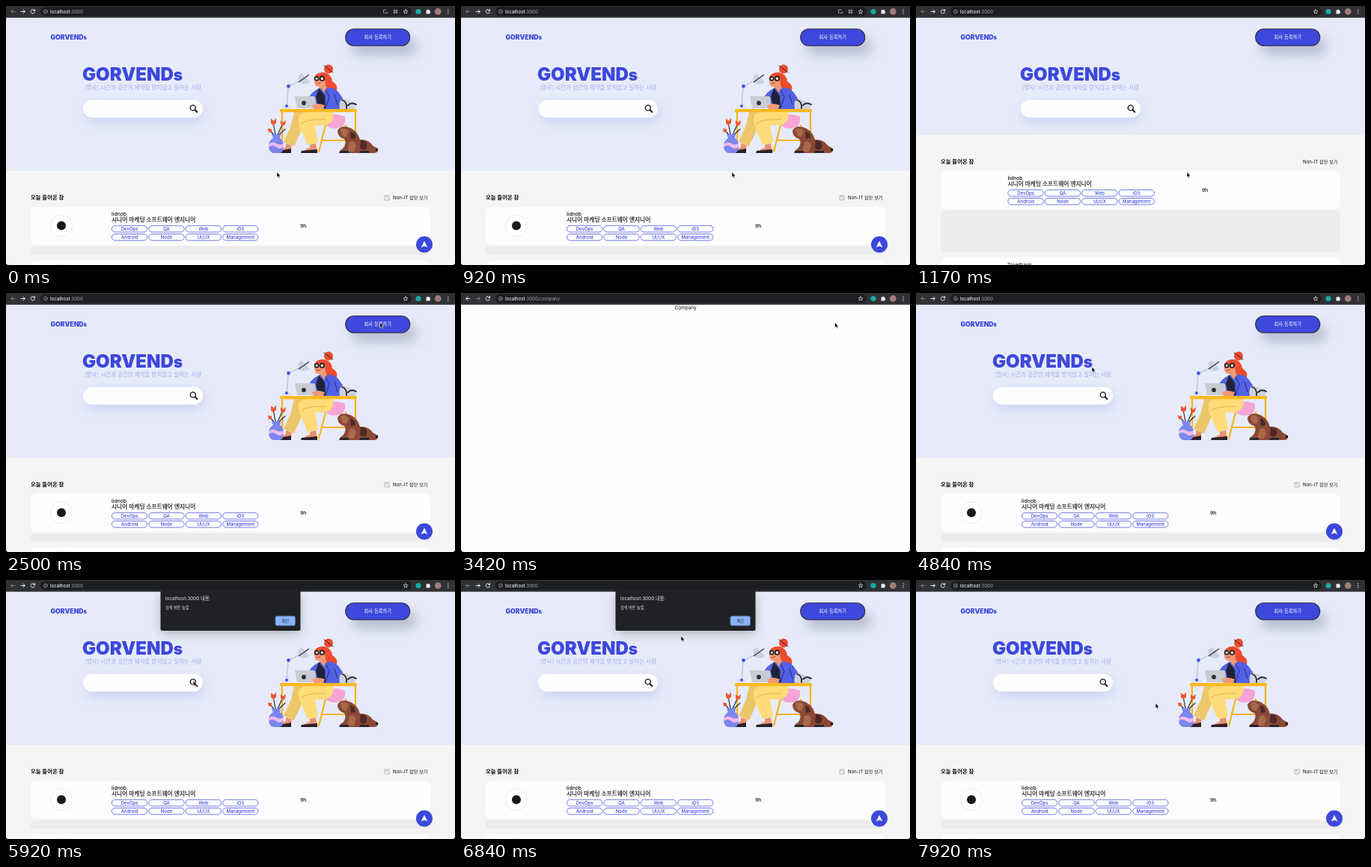
These frames come from a looping animation (600x347 px, 8000 ms). An HTML page:

```html
<!DOCTYPE html>
<html lang="ko">
<head>
<meta charset="utf-8">
<title>Remote job board</title>
<style>
html, body { margin: 0; width: 100%; height: 100%; overflow: hidden; background: #000; }
svg { display: block; }
text { font-family: Inter, "Noto Sans CJK KR", "Noto Sans CJK", sans-serif; font-size: 6.8px; fill: #111; }
.mid { text-anchor: middle; }
.logo { font-weight: 900; fill: #3d48dc; }
.line { fill: none; stroke-linecap: round; stroke-linejoin: round; }
.tag rect { fill: #fff; stroke: #4d57df; stroke-width: .8; }
.tag text { font-size: 6px; font-weight: 500; fill: #3d48dc; }
#job, #age { font-weight: 500; }
.loading .ready, .loading #fresh, .company #home, .home #company, .loading #company { display: none; }
.loading #intro { transform: translateX(37px); }
.loading #list { transform: translateY(-48px); }
.loading #job { transform: translateX(-18.5px); }
.loading #age { transform: translateX(-11px); }
#back, #forward { stroke: #e8eaed; }
.home #back, .loading #back, .company #forward { stroke: #7d7f83; }
</style>
</head>
<body>
<svg width="600" height="347" viewBox="0 0 600 347">
  <defs>
    <clipPath id="window"><path d="M0 0H600V343Q600 347 596 347H4Q0 347 0 343Z"/></clipPath>
    <filter id="soft" x="-40%" y="-150%" width="180%" height="400%"><feGaussianBlur stdDeviation="7.5"/></filter>
  </defs>
  <g clip-path="url(#window)">
    <rect width="600" height="347" fill="#fdfdfd"/>

    <g id="company"><text class="mid" x="300" y="21.8" style="font-size:6.4px">Company</text></g>

    <g id="home">
      <rect y="15" width="600" height="332" fill="#f5f5f5"/>
      <rect id="hero" y="15" width="600" height="206" fill="#e7ebf9"/>
      <text class="logo" x="59.5" y="45.2" style="font-size:8.7px">GORVEND<tspan font-size="7.6">s</tspan></text>
      <rect x="461" y="42" width="88" height="24" rx="12" fill="#737995" opacity=".4" filter="url(#soft)"/>
      <rect x="453.7" y="30.7" width="86" height="22.6" rx="11.3" fill="#3d48dc" stroke="#303038" stroke-width="1.1"/>
      <text class="mid" x="496.8" y="44.3" style="font-size:6.3px;fill:#fff">회사 등록하기</text>

      <g id="intro">
        <text class="logo" x="102" y="99.8" style="font-size:24px">GORVEND<tspan font-size="21">s</tspan></text>
        <text x="105" y="111.6" style="font-size:7.5px;font-weight:300;fill:#a3aaee">[명사] 시간과 공간의 제약을 받지않고 일하는 사람</text>
        <rect x="105" y="132" width="160" height="24" rx="12" fill="#98a4e5" opacity=".34" filter="url(#soft)"/>
        <rect x="103" y="126" width="160" height="23.5" rx="11.7" fill="#fdfdfd"/>
        <g class="line" stroke="#111"><circle cx="249.8" cy="136.4" r="3.5" stroke-width="1.4"/><path d="M252.7 139.4L255.3 142" stroke-width="2"/></g>
      </g>

      <g id="scene" class="ready">
        <!-- lamp -->
        <path d="M375 137L377 108L395 99" class="line" stroke="#c5cae0" stroke-width="1.8"/>
        <path d="M390 94L395 90L406 102Q397 108 392 102Z" fill="#cbd0e1"/>
        <path d="M391 102L405 92" stroke="#32323e" stroke-width="1.2"/>
        <circle cx="377.5" cy="107.5" r="2.4" fill="#4356e0"/>
        <path d="M368 138Q368 132 375 132Q382 132 382 138Z" fill="#dfe3f2"/>
        <circle cx="375" cy="134" r="2" fill="#4356e0"/>
        <!-- desk and stool legs -->
        <path d="M369 141V196M467 141V196M427 160L418 195M454 160L462 194M423 180H458" class="line" stroke="#f5b31e" stroke-width="2.2"/>
        <path d="M426 147Q440 143 453 148Q455 165 437 164Q424 163 426 147Z" fill="#f6a4d5"/>
        <!-- hair, head and jacket -->
        <circle cx="431" cy="84.5" r="6" fill="#ed4c2e"/>
        <path d="M425 80L437 89" class="line" stroke="#25222b" stroke-width="1"/>
        <path d="M412 96Q415 88 425 89Q435 91 436 101Q444 105 442 113Q438 119 430 116L424 103Z" fill="#ed4c2e"/>
        <path d="M412 95Q420 91 426 97L427 106L430 112L420 115L418 108Q412 109 412 100Z" fill="#f19a77"/>
        <path d="M412 95Q419 86 429 94L426 99L422 94Z" fill="#ed4c2e"/>
        <path d="M405 122Q411 111 424 109Q438 108 444 115L456 132L451 138H412L407 133Z" fill="#5262e5"/>
        <path d="M418 110L426 120L427 137H418L414 122Z" fill="#202337"/>
        <path d="M419 108L425 116L429 109Z" fill="#f19a77"/>
        <path d="M427 112L432 122L427 137M439 119L443 132" class="line" stroke="#222970" stroke-width="1"/>
        <g class="line" stroke="#17171d" stroke-width="1.6"><circle cx="415.2" cy="97.2" r="2.5" fill="#f7d5bd"/><circle cx="422.4" cy="97.2" r="2.8" fill="#f7d5bd"/></g>
        <path d="M415 103.5Q418 105 420 102.5" class="line" stroke="#c53831" stroke-width="1"/>
        <!-- trousers and shoes -->
        <path d="M385 142H405L395 166L385 188L371 182L381 160Z" fill="#ecc66a"/>
        <path d="M437 142Q440 158 424 160H413L417 183L403 186L392 160Q387 143 402 142Z" fill="#ffdc78"/>
        <path d="M394 158Q401 151 428 152" class="line" stroke="#dda639" stroke-width=".8"/>
        <path d="M374 184L382 187L380 196H368Q369 191 374 189ZM406 186L414 184L416 196H397Q400 191 406 190Z" fill="#e8916f"/>
        <path d="M366 194L381 191V197H365ZM395 194L416 192V197H394Z" fill="#2b2029"/>
        <!-- desktop -->
        <path d="M446 138Q444 125 451 124L468 131L466 138Z" fill="#cdd1dd"/>
        <path d="M449 126Q456 128 455 137M457 133Q462 128 468 132" class="line" stroke="#262932" stroke-width="1.8"/>
        <rect x="366" y="138" width="103" height="4.2" rx="1" fill="#f9b920"/>
        <path d="M386 121H411Q413 121 413.3 123L415 137H389Z" fill="#c9ccd3"/>
        <circle cx="398" cy="130" r="2.9" fill="#29303d"/>
        <path d="M409 133Q416 129 426 133L424 138H411Z" fill="#f19a77"/>
        <!-- flowers -->
        <path d="M361 177L357 156M361 177L370 157M360 175L353 167M363 174L373 165" class="line" stroke="#272e41" stroke-width="1.2"/>
        <path d="M354 151L358 154L361 150L361 157L357 160L354 157ZM367 153L370 156L374 153L373 159L369 161L367 158ZM350 164L355 165L355 169L351 169Z" fill="#ed5731"/>
        <path d="M355 172H367L366 177Q371 180 371 187Q371 196 366 197H357Q351 195 351 187Q351 181 357 177Z" fill="#7b86ee"/>
        <path d="M351 185Q356 181 361 184T371 184V189Q366 193 361 189T351 189Z" fill="#efb9ec"/>
        <!-- dog -->
        <path d="M443 167Q447 160 456 162Q469 165 473 179Q484 178 490 187L497 191Q498 197 491 197H447Q443 195 450 191Q456 184 452 178Q443 176 443 167Z" fill="#8a4935"/>
        <path d="M447 165Q454 162 458 168L455 175Q448 176 447 165ZM459 183Q465 178 468 187L465 195H456Z" fill="#a9694c"/>
        <path d="M474 180Q484 180 482 190Q478 195 473 190ZM460 168Q467 169 467 177L461 178Z" fill="#4d2928"/>
        <circle cx="495.5" cy="192.5" r="1.8" fill="#202026"/>
        <path d="M447 194H458V197H445ZM473 194H485V197H472Z" fill="#26262f"/>
      </g>

      <g id="list">
        <text x="33" y="259" style="font-size:7.4px;font-weight:700">오늘 들어온 잡</text>
        <g class="ready"><rect x="505.3" y="253" width="7.8" height="7.8" rx="1.3" fill="#cfcfcf"/><path d="M507 257L508.7 258.8L511.5 255" class="line" stroke="#fff" stroke-width="1.1"/></g>
        <text x="517" y="258.5" style="font-size:6.15px">Non-IT 잡만 보기</text>
        <rect x="33" y="269" width="534" height="50.5" rx="8" fill="#fdfdfd"/>
        <g class="ready"><circle cx="74" cy="294.3" r="14.5" fill="#fff" stroke="#e6e6e6" stroke-width=".8"/><circle cx="74" cy="294.3" r="6" fill="#181a1f"/></g>
        <g id="job">
          <text x="141" y="281.4">lidnob</text>
          <text x="141" y="289.4" stroke="#111" stroke-width=".15" style="font-size:7.7px">시니어 마케팅 소프트웨어 엔지니어</text>
          <g id="tags"></g>
        </g>
        <text id="age" x="393" y="297.2">9h</text>
      </g>
      <rect id="gap" x="33" y="322" width="534" height="11.3" rx="5" fill="#ececec"/>
      <rect id="next" x="33" y="341" width="534" height="30" rx="8" fill="#fdfdfd"/>
      <circle class="ready" cx="74" cy="360.5" r="14.5" fill="#fff" stroke="#e6e6e6" stroke-width=".8"/>
      <text id="nextName" x="122" y="349.2">Tovelbank</text>
      <g class="ready"><circle cx="559" cy="319.5" r="11" fill="#3d48dc"/><path d="M559 314.8L563.3 323.5L559 321.5L554.7 323.5Z" fill="#fff"/></g>
    </g>

    <!-- browser bar -->
    <rect width="600" height="15.7" fill="#303135"/>
    <rect x="46" y="1.5" width="496" height="12" rx="6" fill="#1d1e21"/>
    <g class="line" stroke="#e8eaed" stroke-width="1">
      <path id="back" d="M12 7.5H6.8M9 5.2L6.7 7.5L9 9.8"/>
      <path id="forward" d="M20 7.5H25.2M23 5.2L25.3 7.5L23 9.8"/>
      <path d="M38.2 5.9A2.7 2.7 0 1 0 38.5 8.3M38.6 4.5V6.4H36.7"/>
      <g stroke="#a6a8ac" stroke-width=".7"><circle cx="52.8" cy="7.5" r="2.5"/><path d="M52.8 7.3V8.8M52.8 6.1V6.2"/></g>
      <path d="M534 4.8L534.8 6.6L536.8 6.8L535.3 8.1L535.7 10L534 9L532.3 10L532.7 8.1L531.2 6.8L533.2 6.6Z" stroke-width=".7"/>
      <g id="fresh" stroke="#c4c6ca" stroke-width=".7"><path d="M508 5.2H504.5V9.3H510V7.6"/><path d="M519 4.8V10.2M522 4.8V10.2M517.8 6.2H523.2M517.8 8.8H523.2"/></g>
    </g>
    <text x="59" y="9.7" style="font-size:6.1px;font-weight:500;fill:#e8eaed">localhost<tspan id="path" fill="#929499"></tspan></text>
    <circle cx="551" cy="7.5" r="3.6" fill="#17aaa7"/>
    <path d="M561.5 5.6H563A1.2 1.2 0 0 1 565.3 5.6H566.4V7A1.2 1.2 0 0 1 566.4 9.2V10.5H561.5Z" fill="#e8eaed"/>
    <circle cx="577.3" cy="7.5" r="4.4" fill="#a07d78"/>
    <path d="M590.8 5V5.1M590.8 7.5V7.6M590.8 10V10.1" class="line" stroke="#e8eaed" stroke-width="1.3"/>

    <g id="alert">
      <rect x="207" y="20" width="186" height="51" rx="3" opacity=".25" filter="url(#soft)"/>
      <path d="M206.5 14H393.5V65.5Q393.5 68 391 68H209Q206.5 68 206.5 65.5Z" fill="#202124"/>
      <text x="213" y="27.2" style="font-size:6.4px;fill:#e8eaed">localhost:3000 내용:</text>
      <text x="213" y="38.9" style="font-size:5.2px;fill:#e8eaed">검색 버튼 눌림</text>
      <rect x="360" y="48.3" width="26.5" height="12.8" rx="2.2" fill="#8ab4f8" stroke="#5073aa" stroke-width="1"/>
      <text class="mid" x="373.2" y="56.7" style="font-size:5.2px;fill:#202124">확인</text>
    </g>
    <path id="cursor" d="M0 0V7L1.6 5.6L2.7 8L4 7.4L3 5.1H5Z" fill="#080808" stroke="#fff" stroke-width=".6"/>
  </g>
</svg>
<script>
const $ = id => document.getElementById(id);
const LOOP = 8000;

// time, x, y of the pointer tip
const route = [
  [0, 362, 222.5], [1500, 362, 222.5], [2350, 499.5, 39.5], [3420, 499.5, 39.5],
  [3840, 330, 48], [4350, 330, 48], [4840, 235, 99], [5300, 249, 136],
  [6450, 251, 134], [6840, 294, 75], [7180, 371, 54], [7450, 371, 54],
  [7900, 320, 165], [LOOP, 320, 165]
];

$('tags').innerHTML = ['DevOps', 'QA', 'Web', 'iOS', 'Android', 'Node', 'UI/UX', 'Management'].map((name, i) => {
  const x = 141.4 + i % 4 * 49.4, y = 294.3 + (i >> 2) * 11.2;
  return `<g class="tag"><rect x="${x}" y="${y}" width="47.4" height="8.6" rx="4.3"/>
    <text class="mid" x="${x + 23.7}" y="${y + 6.4}">${name}</text></g>`;
}).join('');

function pointer(t) {
  const i = route.findIndex(p => p[0] > t);
  const [t0, x0, y0] = route[i - 1], [t1, x1, y1] = route[i];
  const u = (t - t0) / (t1 - t0), e = u * u * (3 - 2 * u);
  return [x0 + (x1 - x0) * e, y0 + (y1 - y0) * e];
}

function set(id, attrs) {
  for (const name in attrs) $(id).setAttribute(name, attrs[name]);
}

function draw(now) {
  const t = now % LOOP;
  const loading = t >= 1000 && t < 1330;
  const company = t >= 2630 && t < 4380;
  document.body.className = loading ? 'loading' : company ? 'company' : 'home';
  set('hero', { height: loading ? 158 : 206 });
  set('gap', { y: loading ? 274 : 322, height: loading ? 55.5 : 11.3, rx: loading ? 8 : 5 });
  set('next', { y: loading ? 337 : 341 });
  set('nextName', { visibility: loading ? 'visible' : 'hidden' });
  set('fresh', { visibility: t < 1000 ? 'visible' : 'hidden' });
  set('alert', { visibility: t >= 5580 && t < 7420 ? 'visible' : 'hidden' });
  $('path').textContent = company ? ':3000/company' : ':3000';
  set('cursor', { transform: `translate(${pointer(t)})` });
}

const start = performance.now();
function tick() {
  draw(performance.now() - start);
  requestAnimationFrame(tick);
}
tick();
</script>
</body>
</html>
```
